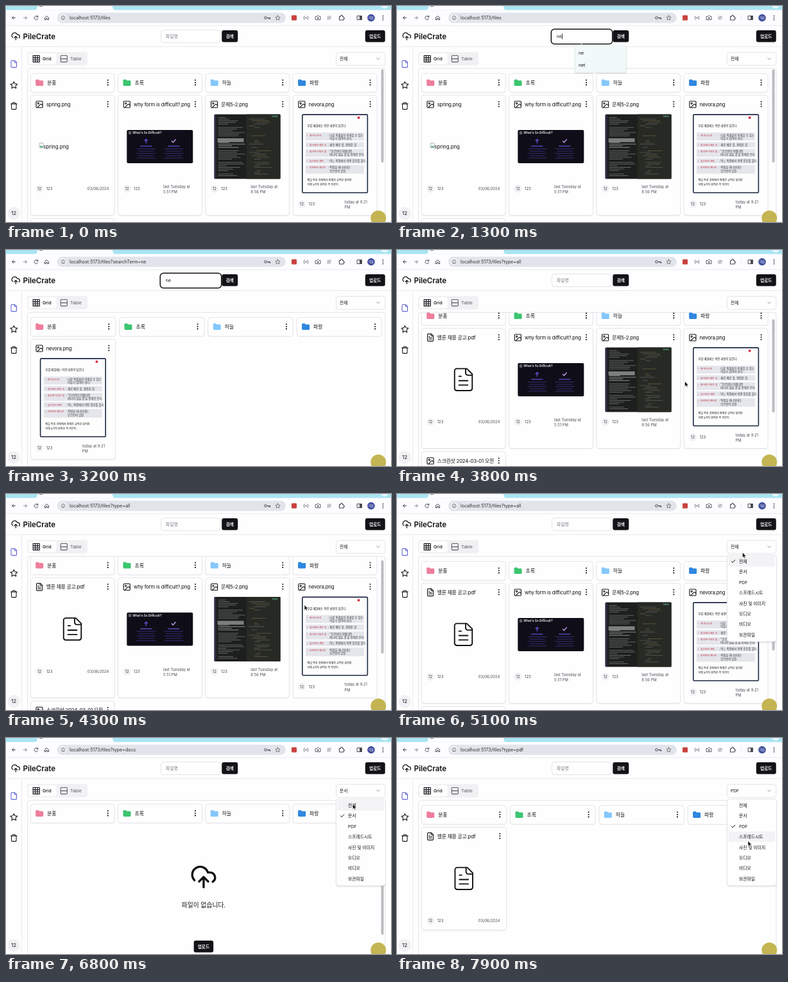
An HTML page that plays this animation: 600x338 px, repeating every 8 s.

```html
<!DOCTYPE html>
<html lang="ko">
<head>
<meta charset="utf-8">
<title>File manager</title>
<style>
html, body { margin: 0; width: 100%; height: 100%; overflow: hidden; background: #fefeff; }
svg { display: block; width: 600px; height: 338px; }
text { font-family: Inter, "Noto Sans CJK KR", "Noto Sans CJK JP", "Noto Sans CJK", sans-serif; white-space: pre; }
</style>
</head>
<body>
<svg id="stage" viewBox="0 0 600 338" xmlns="http://www.w3.org/2000/svg"></svg>
<script>
const LOOP = 8000;
const INK = '#111114', LINE = '#e4e4e9';

// ---- drawing helpers ----
const rect = (x, y, w, h, fill, r = 0, more = '') =>
  `<rect x="${x}" y="${y}" width="${w}" height="${h}" rx="${r}" fill="${fill}" ${more}/>`;
const box = (x, y, w, h, r = 4, stroke = LINE, sw = 1) =>
  rect(x, y, w, h, '#fefeff', r, `stroke="${stroke}" stroke-width="${sw}"`);
const dot = (x, y, r, fill) => `<circle cx="${x}" cy="${y}" r="${r}" fill="${fill}"/>`;
// y is the middle of the line
const text = (x, y, size, str, fill = INK, more = '') =>
  `<text x="${x}" y="${(y + size * 0.36).toFixed(2)}" font-size="${size}" fill="${fill}" ${more}>${str}</text>`;
const line = (d, stroke = INK, sw = 1, more = '') =>
  `<path d="${d}" fill="none" stroke="${stroke}" stroke-width="${sw}" stroke-linecap="round" stroke-linejoin="round" ${more}/>`;
// 24-unit icon centred on x, y
const icon = (d, x, y, scale, stroke = INK, sw = 2) =>
  `<g transform="translate(${x} ${y}) scale(${scale}) translate(-12 -12)">${line(d, stroke, sw)}</g>`;
const group = (id, body, more = '') => `<g id="${id}" ${more}>${body}</g>`;
const MID = 'text-anchor="middle"', MEDIUM = 'font-weight="500"';

const ICONS = {
  cloud: 'M4 14.9A7 7 0 1 1 15.7 8h1.8a4.5 4.5 0 0 1 2.5 8.2M12 12v9M16 16l-4-4-4 4',
  page: 'M15 2H6a2 2 0 0 0-2 2v16a2 2 0 0 0 2 2h12a2 2 0 0 0 2-2V7ZM14 2v4a2 2 0 0 0 2 2h4',
  lines: 'M10 9H8M16 13H8M16 17H8',
  image: 'M5 3h14a2 2 0 0 1 2 2v14a2 2 0 0 1-2 2H5a2 2 0 0 1-2-2V5a2 2 0 0 1 2-2ZM7 9a2 2 0 1 0 4 0a2 2 0 1 0-4 0M21 15l-3.1-3.1a2 2 0 0 0-2.8 0L6 21',
  star: 'M12 2l3.1 6.3 6.9 1-5 4.9 1.2 6.8L12 17.8 5.8 21 7 14.2 2 9.3l6.9-1Z',
  trash: 'M3 6h18M19 6v14a2 2 0 0 1-2 2H7a2 2 0 0 1-2-2V6M8 6V4a2 2 0 0 1 2-2h4a2 2 0 0 1 2 2v2',
  grid: 'M3 3h18v18H3ZM3 9h18M3 15h18M9 3v18M15 3v18',
  rows: 'M5 3h14a2 2 0 0 1 2 2v14a2 2 0 0 1-2 2H5a2 2 0 0 1-2-2V5a2 2 0 0 1 2-2ZM3 12h18'
};
ICONS.doc = ICONS.page + ICONS.lines;

function seeded(seed) {
  return () => (seed = (seed * 16807) % 2147483647) / 2147483647;
}

// ---- browser bar ----
function browserBar() {
  const grey = '#4a4c52';
  return rect(0, 0, 600, 31, '#fdfdff') +
    rect(0, 0, 600, 6.3, '#a9e4f3') + dot(590, -2, 6, '#e4f6fb') +
    '<path d="M44 6.3Q49 6.3 49 0H166Q166 6.3 171 6.3Z" fill="#fdfdff"/>' + rect(52, 0, 5, 1.2, '#8a8d94') +
    line('M14.5 18.5H9.5M12 16l-2.5 2.5 2.5 2.5', grey) +
    line('M27.5 18.5H32.5M30 16l2.5 2.5-2.5 2.5', '#8c8e94') +
    line('M49.3 16.8A2.9 2.9 0 1 0 49.7 19.6M49.7 15.2v2h-2', grey) +
    line('M60.5 18.2L63.5 15.6 66.5 18.2V21.5H64.6V19.3H62.4V21.5H60.5Z', grey) +
    rect(80, 10.5, 356, 16, '#e1e4eb', 8) + dot(89, 18.5, 5, '#fbfcfe') +
    line('M89 17v.1M89 18.5v1.7', grey, .9) + `<circle cx="89" cy="18.5" r="3" fill="none" stroke="${grey}" stroke-width=".8"/>` +
    `<circle cx="404.5" cy="18.5" r="1.9" fill="none" stroke="${grey}"/>` + line('M406.5 18.5H411.5V20.3M409.5 18.5V20', grey, 1.2) +
    icon(ICONS.star, 423.5, 18.5, .36, grey) +
    rect(445, 14.5, 8, 8, '#c9423f', 1) +
    line('M465 15.8Q463 18.5 465 21.2M470 15.8Q472 18.5 470 21.2', grey, .8) + dot(467.5, 18.5, 1.1, grey) +
    line('M482.5 16.5H484.2L485 15.4H487.5L488.3 16.5H490V21.5H482.5Z', grey, .9) + dot(486.2, 19, 1.3, grey) +
    rect(500, 15, 7, 7, '#d5d7da', 2) + line('M501.5 20L505.5 16.5', '#85888d', .9) +
    line('M519.5 16.5H521.5Q521.5 14.3 523 14.3T524.5 16.5H526V18.3Q527.5 18.3 527.5 19.3T526 20.4V22H519.5Z', grey, 1.1) +
    rect(536.2, 14, .7, 9, '#dfe1e6') +
    line('M547.5 15.5H554.5V21.5H547.5Z', grey) + rect(551, 15.5, 3.5, 6, grey) +
    dot(569, 18.5, 5.8, '#424f9e') + text(569, 18.5, 4.2, '하솔', '#fff', MID) +
    [15.5, 18.5, 21.5].map(y => dot(587.5, y, .9, grey)).join('') +
    rect(0, 30.5, 600, .7, '#e2e4ea');
}

// ---- page frame ----
function blackButton(x, y, w, label) {
  return rect(x, y, w, 18.6, '#131317', 3) + text(x + w / 2, y + 9.3, 6.7, label, '#fff', MID + ' font-weight="600"');
}

function pageFrame() {
  return icon(ICONS.cloud, 15.3, 47.4, .62) +
    text(26.5, 47.6, 11.5, 'PileCrate', INK, 'font-weight="600"') +
    blackButton(336.3, 38, 25, '검색') + blackButton(559.8, 38, 31, '업로드') +
    rect(0, 63.3, 600, .8, LINE) + rect(24.3, 64, .8, 274, LINE) +
    icon(ICONS.page, 12.2, 90.8, .53, '#5b5fd0') +
    icon(ICONS.star, 12.3, 123.8, .54) + icon(ICONS.trash, 12.3, 156.3, .53) +
    dot(12, 324.4, 10, '#f1f1f4') + text(12, 324.6, 8, '12', INK, MID) +
    rect(33, 72, 94, 21, '#f1f1f4', 4) + rect(35, 74, 43.5, 17, '#fefeff', 3) +
    icon(ICONS.grid, 47.2, 82.6, .56) + text(57, 82.6, 6.8, 'Grid', INK, MEDIUM) +
    icon(ICONS.rows, 90.3, 82.6, .56, '#5f6068') + text(100, 82.6, 6.8, 'Table', '#6b6c75', MEDIUM) +
    line('M33.5 338V101.5a4 4 0 0 1 4-4H587a4 4 0 0 1 4 4V338', LINE);
}

// ---- thumbnails, placed relative to the card's left edge ----
function slideThumb(x) {
  const cols = [[30, '#5a48c4', 'M0 3V-3M-2.2 -.8L0 -3 2.2 -.8'], [73, '#b796e0', 'M-2.8 0L-1 2 3 -2.5']];
  return rect(x, 194, 103, 52, '#0f0d17', 2) + rect(x + 2.5, 196, 4.5, 5, '#5c5d66', 1) +
    text(x + 9, 198.8, 4.7, 'What\'s So Difficult?', '#dcdce2', 'font-weight="700"') +
    cols.map(([cx, c, d]) => `<g transform="translate(${x + cx} 211.5)">${line(d, c, 1.5)}</g>` +
      rect(x + cx - 9, 218.5, 18, 1.7, '#4a43a6') +
      [0, 1, 2, 3, 4].map(i => rect(x + cx - 15 + i % 2 * 3, 223 + i * 3.6, 30 - i % 2 * 6, 1, '#332d72')).join('')).join('');
}

function codeThumb(x) {
  const rnd = seeded(77);
  let s = rect(x, 169.5, 103, 101, '#1d1f1e', 1.5) + rect(x, 170, 3, 100, '#2f2c48') + rect(x + 50, 169.5, 53, 101, '#272924', 1);
  for (let i = 0; i < 36; i++) {
    const y = 174 + i * 2.6;
    if (i % 7 !== 5) s += rect(x + 6, y, 12 + rnd() * 30, 1, i > 12 && i < 20 ? '#8b8d8c' : '#646665');
    if (rnd() > .25) s += rect(x + 54 + Math.floor(rnd() * 4) * 4, y, 6 + rnd() * 22, .9, ['#4d574a', '#595c55', '#5f583f'][i % 3]);
  }
  return s + rect(x + 5, 207, 41, 6, '#7d7f7e') + rect(x + 90, 171.5, 9, 2.4, '#3d7259');
}

const MEMO = [
  [198, 12.4, '왜 떠나는지', ': 다른 직원들이 이해할 수 있는', '  이유가 있어야 한다.'],
  [213, 8.2, '회사에서 배운 것', ': 새로 배운 것, 경험한 것.'],
  [223.7, 12.4, '회사에 아쉬운 점', ': “모르빈이 이랬다면', '  떠나지 않을 것’을 전제로 쓴다.'],
  [238.2, 8.2, '앞으로의 계획', ': 어느 직장에서 어떤 업무를 할지.'],
  [248.8, 13.6, '모르빈의 메시지', ': 직원을 떠나보내는', '  모르빈의 입장.']
];
function memoThumb(x) {
  return rect(x + .9, 169.9, 101.6, 122.4, '#fdfdfe', 1.5, 'stroke="#1d2740" stroke-width="1.6"') +
    rect(x + 87, 173, 3.5, 3.5, '#d8324a') +
    text(x + 8.5, 187.8, 4.3, '부검 메일에는 이런 내용이 담긴다.', INK, MEDIUM) +
    MEMO.map(([y, h, label, ...rows]) => rect(x + 6, y, 91, h, '#e4e6eb') + dot(x + 8.6, y + 4.2, .5, '#c93850') +
      text(x + 12, y + 4.2, 3.8, label, '#c4293f', MEDIUM) +
      rows.map((r, i) => text(x + 41, y + 4 + i * 5.2, 4.3, r, '#2b2d33')).join('')).join('') +
    text(x + 8.5, 272.8, 4.1, '메일 작성 과정에서 정해진 규칙은 없지만', INK, MEDIUM) +
    text(x + 8.5, 280, 4.1, '아래 3가지 원칙은 꼭 지킨다.', INK, MEDIUM);
}

function brokenThumb(x) {
  return rect(x, 214.5, 6, 7.5, '#fff', .5, 'stroke="#8f99a3" stroke-width=".7"') +
    `<path d="M${x + .5} 221l2-3 1.5 2 1.5-1 0 2.5z" fill="#4aa564"/>` + text(x + 6.3, 220, 7.8, 'spring.png');
}

const FILES = {
  spring: { name: 'spring.png', thumb: brokenThumb, date: ['03/06/2024'] },
  form: { name: 'why form is difficult?.png', thumb: slideThumb, date: ['last Tuesday at', '5:51 PM'], at: 71 },
  task: { name: '문제5-2.png', thumb: codeThumb, date: ['last Tuesday at', '8:56 PM'], at: 71 },
  memo: { name: 'nevora.png', thumb: memoThumb, date: ['today at 9:21', 'PM'], at: 81, foot: 310 },
  pdf: { name: '벨룬 채용 공고.pdf', doc: true, thumb: x => icon(ICONS.doc, x + 51.5, 219.8, 1.72, INK, 1.1), date: ['03/06/2024'] }
};
const FOLDERS = [['분홍', '#ee7e9c'], ['초록', '#3cc570'], ['하늘', '#84c7fb'], ['파랑', '#2f87df']];

const kebab = (x, y) => [-3.7, 0, 3.7].map(d => dot(x, y + d, 1.05, INK)).join('');

function cardHead(x, y, w, h, name, doc) {
  return rect(x + .5, y + 1.2, w - 1, h - .5, '#eeeef2', 4) + box(x + .5, y + .5, w - 1, h - 1) +
    icon(doc ? ICONS.doc : ICONS.image, x + 14.3, y + 15, .56) +
    text(x + 25, y + 15, 7.8, name, INK, 'letter-spacing="-.2"') + kebab(x + w - 11, y + 14.5);
}

function card(x, w, key, h) {
  const f = FILES[key], foot = f.foot || 286.3;
  const dates = f.date.map((d, i) =>
    text(x + (f.at || 89), foot + (f.date.length > 1 ? i * 8.2 - 3.2 : 0), 5.9, d, '#4d4e56')).join('');
  return cardHead(x, 139, w, h, f.name, f.doc) + f.thumb(x + (w > 132 ? 15 : 14.3)) +
    dot(x + 14.5, foot, 6, '#f1f1f4') + text(x + 14.5, foot, 5.9, '12', '#3b3c42', MID) +
    text(x + 25, foot, 5.9, '123', '#3b3c42') + dates;
}

function folder(x, w, [name, color], id) {
  return rect(x + .5, 106.7, w - 1, 29, '#eeeef2', 4, `id="${id}"`) + box(x + .5, 105.5, w - 1, 29.5) +
    `<path transform="translate(${x + 8.5} 115)" fill="${color}" d="M1.3 0H4.4L6 1.6H10.6Q12 1.6 12 3V8.6Q12 10 10.6 10H1.4Q0 10 0 8.6V1.3Q0 0 1.3 0Z"/>` +
    text(x + 26.5, 120.2, 7.8, name) + kebab(x + w - 11, 119.7);
}

function view(id, wide, keys, h, extra = '') {
  const w = wide ? 133.6 : 132, step = wide ? 138.3 : 136.3;
  const at = i => 37.7 + i * step;
  return group(id, FOLDERS.map((f, i) => folder(at(i), w, f, id + 'Folder' + i)).join('') +
    keys.map((k, i) => card(at(i), w, k, h)).join('') + extra);
}

const nextRow = cardHead(37.7, 332, 132, 180, '스크린샷 2024-03-01 오전');
const empty = icon(ICONS.cloud, 308, 219.5, 1.78, INK, 1.9) +
  text(308, 263, 9.75, '파일이 없습니다.', INK, MID) + blackButton(292.7, 319, 30.5, '업로드');

// ---- menu, field, pointers ----
const TYPES = ['전체', '문서', 'PDF', '스프레드시트', '사진 및 이미지', '오디오', '비디오', '보관파일'];
const rowY = i => 105.3 + i * 16.45;
const menu = rect(514.5, 96.5, 77, 136, '#000', 4, 'opacity=".06"') + rect(513.5, 97.5, 79, 136.5, '#000', 5, 'opacity=".035"') +
  box(514.5, 95.5, 77, 135.5) + rect(516.5, 0, 73, 16.4, '#f3f3f5', 2, 'id="mark"') +
  line('M-2.6 0L-.8 1.9 2.8-2', INK, 1, 'id="tick"') +
  TYPES.map((t, i) => text(533, rowY(i), 6.8, t)).join('');

const suggest = rect(276.5, 63, 81.5, 43, '#000', 4, 'opacity=".08"') +
  '<path d="M283.5 62.5L287.5 59 291.5 62.5Z" fill="#eef6f6"/>' +
  rect(277, 62, 80, 42, '#f2f9f9', 4, 'stroke="#dfe8e9" stroke-width=".7"') +
  text(283, 73.8, 6.9, 'ne') + text(283, 92.6, 6.9, 'net');

const arrow = '<path id="arrow" d="M0 0V8.2L1.9 6.5 3.1 9.2 4.5 8.6 3.3 6H5.8Z" fill="#111" stroke="#fff" stroke-width=".6"/>';
const hand = '<path id="hand" d="M-.8 .9Q-.8 0 0 0T.8 .9V3.4L3.4 3.8Q4.3 4 4.3 5V6.3L3.4 8.8H-1.2L-3.2 5.6Q-3.4 4.5-2.4 4.7L-.8 5.8Z" fill="#fff" stroke="#111" stroke-width=".8"/>';

const stage = document.getElementById('stage');
stage.innerHTML = '<defs><clipPath id="pane"><rect x="34" y="98" width="556.5" height="240"/></clipPath></defs>' +
  rect(0, 0, 600, 338, '#fefeff') + browserBar() + text(99, 18.6, 7.05, '', '#2b2d32', 'id="url"') + pageFrame() +
  group('field', box(241.5, 37.5, 92.5, 20)) +
  group('ring', box(240.3, 36.3, 95.4, 23.2, 5, INK, 1.5)) +
  text(249, 47.6, 6.8, '파일명', '#74757e', 'id="hint"') + text(249, 47.6, 6.8, '', INK, 'id="query"') +
  rect(249, 43, .8, 9, INK, 0, 'id="caret"') +
  '<g clip-path="url(#pane)">' + group('scroller',
    view('home', false, ['spring', 'form', 'task', 'memo'], 189, nextRow) +
    view('search', true, ['memo'], 189) +
    view('all', false, ['pdf', 'form', 'task', 'memo'], 189, nextRow) +
    view('docs', false, [], 0, empty) +
    view('pdf', true, ['pdf'], 162)) + '</g>' +
  rect(584.6, 99, 4, 146, '#bcbcc0', 2, 'id="thumb"') +
  group('pick', box(514.5, 72.5, 76.5, 20.5)) +
  group('pickRing', box(512.7, 70.7, 79.6, 24, 5, INK, 1.4)) +
  text(520, 82.7, 6.7, '', INK, 'id="picked"') + line('M577.8 81.5L580 83.7 582.2 81.5', '#85868e', .9) +
  group('suggest', suggest) + group('menu', menu) +
  dot(580.3, 332, 12, '#c4b552') +
  group('cursor', arrow + hand);

// ---- timeline ----
const VIEWS = [[0, 'home', ''], [1800, 'search', '?searchTerm=ne'], [3500, 'all', '?type=all'], [5500, 'docs', '?type=docs'], [7100, 'pdf', '?type=pdf']];
const THUMB = { home: 146, all: 146, docs: 208 };
const FOCUS = 400, TYPED = [[800, 'n'], [1100, 'ne']], SUBMIT = 1800, CUT = 3500;
const MENUS = [[4800, 5500, 0], [6600, 7100, 1], [7400, LOOP, 2]];
const SCROLL = [[3500, 0], [3700, 17], [3900, 17], [4300, 8.5], [4500, 0], [5500, 0], [5501, 2], [7100, 2], [7101, 0]];
const PATH = [[3500, 453, 216], [3800, 448.5, 205.5], [4050, 450, 200], [4300, 465, 173.5], [4700, 538, 82], [5000, 538, 84],
  [5350, 540, 121], [5500, 540, 121], [5900, 527, 104], [6200, 527, 104], [6500, 540, 82], [6700, 540, 84],
  [6950, 541, 138], [7250, 541, 138], [7400, 543, 83], [7500, 543, 84], [7850, 547, 161]];

const last = (steps, t) => steps.filter(s => s[0] <= t).pop();
function tween(steps, t) {
  const a = last(steps, t) || steps[0], b = steps[steps.indexOf(a) + 1];
  if (!b || t < a[0]) return a.slice(1);
  const p = (t - a[0]) / (b[0] - a[0]), e = p * p * (3 - 2 * p);
  return a.slice(1).map((v, i) => v + (b[i + 1] - v) * e);
}

const el = id => document.getElementById(id);
const show = (id, on) => el(id).setAttribute('visibility', on ? 'visible' : 'hidden');
const attr = (id, name, v) => el(id).setAttribute(name, v);

function render(t) {
  const [, now, query] = last(VIEWS, t);
  VIEWS.forEach(v => attr(v[1], 'display', v[1] === now ? 'inline' : 'none'));
  el('url').textContent = 'localhost:5173/files' + query;

  const focused = t >= FOCUS && t < CUT;
  const typed = t < CUT ? last(TYPED, t) : null;
  show('ring', focused);
  show('hint', !typed);
  el('query').textContent = typed ? typed[1] : '';
  show('suggest', typed && t < SUBMIT);
  const since = t - (typed ? typed[0] : FOCUS);
  show('caret', focused && t < SUBMIT && since % 1000 < 500);
  attr('caret', 'x', 249.2 + (typed ? el('query').getComputedTextLength() : 0));

  const [scroll] = tween(SCROLL, t);
  attr('scroller', 'transform', `translate(0 ${-scroll})`);
  show('thumb', now in THUMB);
  attr('thumb', 'height', THUMB[now] || 0);
  attr('thumb', 'y', 99 + scroll * .55);

  const kind = now === 'docs' ? 1 : now === 'pdf' ? 2 : 0;
  const open = MENUS.find(m => t >= m[0] && t < m[1]);
  const [x, y] = tween(PATH, t);
  el('picked').textContent = TYPES[kind];
  show('pickRing', !open && t >= 5500 && t < 7400);
  show('menu', open);
  if (open) {
    const over = Math.floor((y - 97) / 16.45);
    attr('menu', 'opacity', Math.min(1, (t - open[0] + 40) / 120));
    attr('mark', 'y', rowY(over < 0 ? open[2] : over) - 8.2);
    attr('tick', 'transform', `translate(524 ${rowY(open[2])})`);
  }

  const onFolder = now === 'docs' && !open && y > 103 && y < 133;
  attr('docsFolder3', 'fill', onFolder ? '#d9d9df' : '#eeeef2');
  attr('docsFolder3', 'y', onFolder ? 108 : 106.7);
  show('cursor', t >= CUT);
  attr('cursor', 'transform', `translate(${x} ${y})`);
  attr('arrow', 'display', onFolder ? 'none' : 'inline');
  attr('hand', 'display', onFolder ? 'inline' : 'none');
}

const start = performance.now();
function tick() {
  render((performance.now() - start) % LOOP);
  requestAnimationFrame(tick);
}
tick();
</script>
</body>
</html>
```
